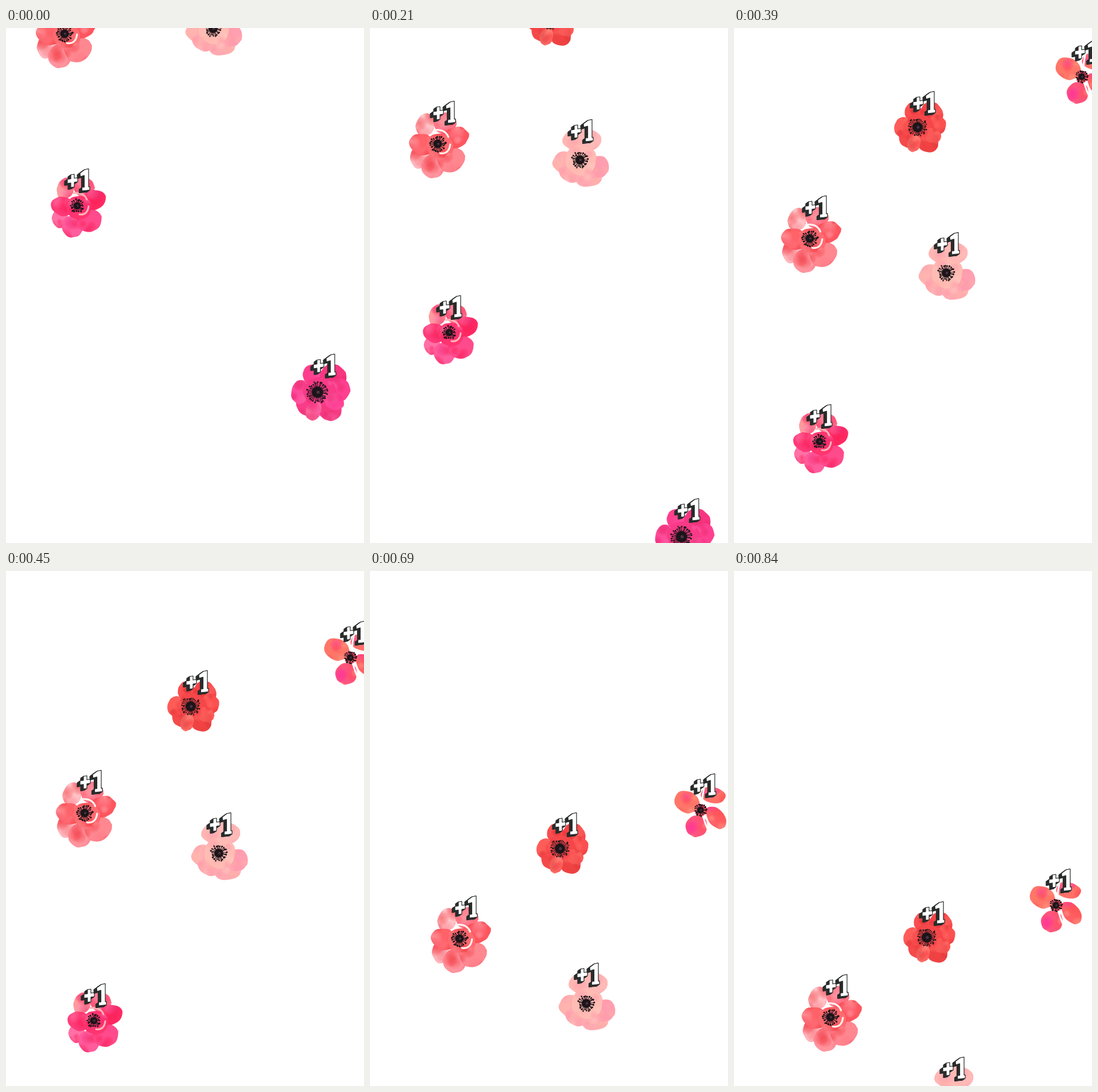
An HTML page with a canvas that plays this animation: 624x898 px, repeating every 870 ms.

```html
<!DOCTYPE html>
<html lang="en">
<head>
<meta charset="utf-8">
<title>Falling flowers</title>
<style>
  html, body { margin: 0; width: 100%; height: 100%; overflow: hidden; background: #fff; }
  canvas { display: block; }
</style>
</head>
<body>
<canvas id="stage" width="624" height="898"></canvas>
<script>
const LOOP = 870, STEP = 30, SIZE = 160;
const stage = document.getElementById('stage').getContext('2d');

// Petals from back to front: x, y, rx, ry, rotation in degrees
const shapes = {
  rosette: [[-20, -30, 15, 19, 20], [12, -32, 18, 18, 0], [-30, 22, 14, 17, 0], [-8, 36, 19, 19, 0],
            [21, 25, 22, 21, -20], [-25, 1, 21, 17, 15], [29, -10, 21, 17, -20], [3, 3, 23, 20, 0]],
  poppy: [[-8, -29, 17, 20, -15], [27, -26, 23, 24, -25], [37, -4, 20, 20, 0], [21, 30, 21, 20, 20],
          [-20, 22, 17, 20, -25], [-30, 0, 16, 21, 10], [3, 0, 28, 27, 0], [-7, 32, 13, 18, 20], [29, 16, 18, 15, 25]],
  round: [[4, -34, 35, 21, 0], [-27, 4, 21, 19, -20], [-16, 23, 21, 16, 20], [16, 31, 24, 16, -10],
          [32, 12, 19, 20, 20], [1, 0, 28, 27, 0]],
  open: [[-23, -14, 23, 19, 30], [22, -26, 22, 14, 12], [27, 13, 14, 22, -38], [-7, 28, 19, 19, 0], [0, 0, 11, 11, 0]]
};

// Light strokes between petals: start, control, end
const slits = {
  rosette: [[-6, -22, 12, -24, 17, -11], [4, 15, 18, 17, 20, 1]],
  poppy: [],
  round: [],
  open: [[3, -11, 3, -25, 7, -42], [11, -7, 24, -9, 42, -4], [5, 12, 8, 24, 15, 38], [-10, 4, -18, 6, -26, 11]]
};

// x, y at time zero; vx, vy in pixels per ms; badge is the offset of the +1
const flowers = [
  { shape: 'rosette', scale: 1, x: 124, y: 310, vx: .065, vy: 1.0526, badge: [-23, -65], core: 12, slit: '#ffb5b5',
    colors: ['#ff9c9c', '#ff7f96', '#ff70a6', '#ff5c9e', '#ff4a8c', '#ff3a78', '#ff2a65', '#ff3470'],
    washes: ['#ff1f55', '#ff85b5', '#f02a70'] },
  { shape: 'poppy', scale: 1, x: 543, y: 635, vx: .001, vy: 1.2, badge: [-13, -67], core: 19,
    colors: ['#ff3d8d', '#f83580', '#ff4090', '#f53a80', '#fa3c88', '#ff4c9a', '#f93a86', '#ff6a9c', '#ff4b9a'],
    washes: ['#e82a6e', '#ff65aa', '#ff3590'] },
  { shape: 'rosette', scale: 1.09, x: 102, y: 10, vx: .078, vy: .9148, badge: [-14, -75], core: 14, slit: '#fff0ee',
    colors: ['#ffc9cc', '#ff7488', '#ffbac2', '#ff949e', '#ff8790', '#ff6268', '#ff555e', '#ff6a70'],
    washes: ['#f2373f', '#ffb5bc', '#ff7785'] },
  { shape: 'round', scale: 1, x: 361.4, y: .7, vx: .0222, vy: 1.092, badge: [-22, -71], core: 15,
    colors: ['#ffb9b6', '#ffb4b0', '#ffaeb0', '#ffaab0', '#ff9fb0', '#ffbcb4'],
    washes: ['#ff98a8', '#ffcbc2', '#ffb0a8'] },
  { shape: 'poppy', scale: .88, x: 306.5, y: -230, vx: .035, vy: 1.0345, badge: [-14, -63], core: 17,
    colors: ['#fb4e50', '#f64347', '#fc5050', '#ee4242', '#f44a4a', '#ff5c58', '#f5474a', '#ff7a70', '#ff5a58'],
    washes: ['#dc3236', '#ff7068', '#fb4248'] },
  { shape: 'open', scale: 1, x: 645, y: -347.5, vx: -.1005, vy: 1.108, badge: [-18, -64], core: 11, slit: '#fff',
    colors: ['#ff7668', '#ff7068', '#ff6266', '#ff5480', '#ff5a70'],
    washes: ['#ff4f50', '#ff9c88', '#ff2f9a'] }
];

function makeRandom(seed) {
  return () => (seed = (seed * 16807) % 2147483647) / 2147483647;
}

function makeLayer(width, height) {
  const canvas = document.createElement('canvas');
  canvas.width = width;
  canvas.height = height;
  return canvas.getContext('2d');
}

function tracePetal(g, [x, y, rx, ry, degrees], random) {
  const turn = degrees * Math.PI / 180, count = 18, points = [];
  for (let i = 0; i < count; i++) {
    const a = i / count * 2 * Math.PI, r = .94 + random() * .12;
    const u = Math.cos(a) * rx * r, v = Math.sin(a) * ry * r;
    points.push([x + u * Math.cos(turn) - v * Math.sin(turn), y + u * Math.sin(turn) + v * Math.cos(turn)]);
  }
  g.beginPath();
  for (let i = 0; i <= count; i++) {
    const [px, py] = points[i % count], [qx, qy] = points[(i + 1) % count];
    g.quadraticCurveTo(px, py, (px + qx) / 2, (py + qy) / 2);
  }
  g.closePath();
}

function drawWashes(g, petal, washes, random) {
  const [x, y, rx, ry] = petal;
  g.save();
  g.clip();
  for (let i = 0; i < 7; i++) {
    const cx = x + (random() - .5) * 2 * rx, cy = y + (random() - .5) * 2 * ry, r = 5 + random() * 10;
    const color = washes[i % 3], wash = g.createRadialGradient(cx, cy, 0, cx, cy, r);
    wash.addColorStop(0, color + '88');
    wash.addColorStop(.6, color + '50');
    wash.addColorStop(1, color + '00');
    g.fillStyle = wash;
    g.fillRect(cx - r, cy - r, 2 * r, 2 * r);
  }
  g.restore();
}

function drawStamens(g, radius, random) {
  g.fillStyle = g.strokeStyle = '#1c1519';
  g.lineWidth = 1.1;
  const dot = (x, y, r) => { g.beginPath(); g.arc(x, y, r, 0, 7); g.fill(); };
  dot(0, 0, radius * .52);
  const count = Math.round(radius * 1.7);
  for (let i = 0; i < count; i++) {
    const a = (i + random() * .6) / count * 2 * Math.PI, r = radius * (.72 + random() * .28);
    const x = Math.cos(a) * r, y = Math.sin(a) * r;
    g.beginPath();
    g.moveTo(x * .45, y * .45);
    g.lineTo(x, y);
    g.stroke();
    dot(x, y, 1.1 + random() * .6);
  }
  g.fillStyle = '#4b3343';
  dot(1, 0, radius * .15);
}

function paintFlower(flower, index) {
  const random = makeRandom(977 + index * 131), g = makeLayer(SIZE, SIZE);
  g.translate(SIZE / 2, SIZE / 2);
  g.scale(flower.scale, flower.scale);
  shapes[flower.shape].forEach((petal, i) => {
    tracePetal(g, petal, random);
    g.fillStyle = flower.colors[i];
    g.fill();
    g.strokeStyle = flower.washes[0] + '48';
    g.lineWidth = .8;
    g.stroke();
    drawWashes(g, petal, flower.washes, random);
  });
  g.lineCap = 'round';
  g.strokeStyle = flower.slit;
  g.lineWidth = 3;
  for (const [x, y, cx, cy, ex, ey] of slits[flower.shape]) {
    g.beginPath();
    g.moveTo(x, y);
    g.quadraticCurveTo(cx, cy, ex, ey);
    g.stroke();
  }
  drawStamens(g, flower.core / flower.scale, random);
  return g.canvas;
}

function paintBadge() {
  const g = makeLayer(50, 46);
  const plus = new Path2D('M12 11l6-1v7l6-1v7l-6 1v8l-6 1v-8l-6 1v-7l6-1z');
  const one = new Path2D('M28 8l8-6 7-1.5v31.5l2-.3v5.8l-13.5 1.5v-6l4-.5V12l-7 2z');
  g.lineJoin = 'round';
  for (const glyph of [plus, one]) {
    g.fillStyle = g.strokeStyle = '#2b2d2d';
    g.lineWidth = 1.2;
    for (let d = 5; d > 0; d -= .5) {
      g.save();
      g.translate(-d, d * .7);
      g.fill(glyph);
      g.stroke(glyph);
      g.restore();
    }
    g.fillStyle = '#fff';
    g.fill(glyph);
    g.stroke(glyph);
  }
  return g.canvas;
}

const images = flowers.map(paintFlower), badge = paintBadge();

function render(now) {
  const t = Math.floor(now % LOOP / STEP) * STEP;
  stage.fillStyle = '#fff';
  stage.fillRect(0, 0, 624, 898);
  flowers.forEach((f, i) => {
    const x = Math.round(f.x + f.vx * t), y = Math.round(f.y + f.vy * t);
    stage.drawImage(images[i], x - SIZE / 2, y - SIZE / 2);
    stage.drawImage(badge, x + f.badge[0], y + f.badge[1]);
  });
}

function tick() {
  render(performance.now());
  requestAnimationFrame(tick);
}
tick();
</script>
</body>
</html>
```
